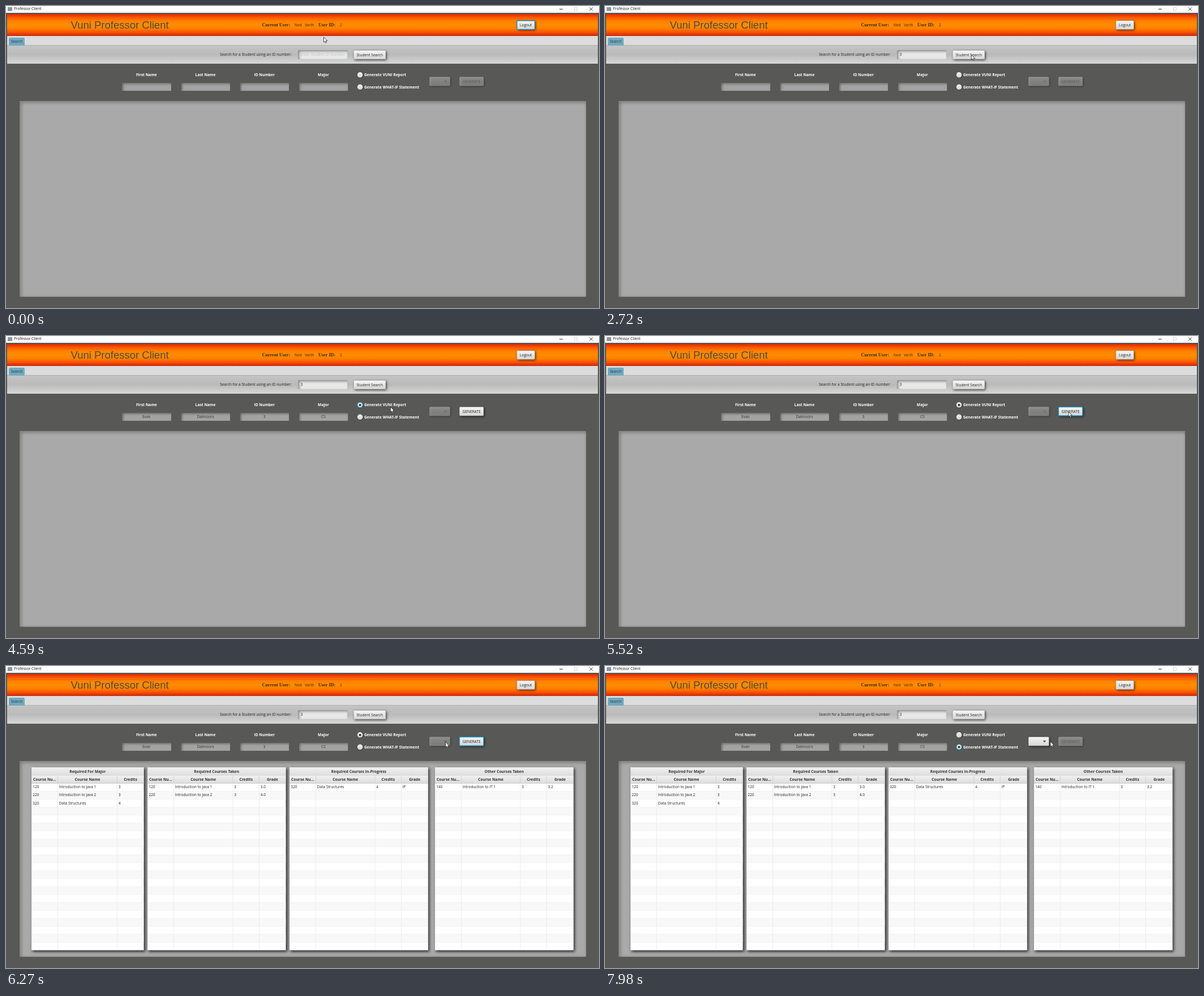
Write an HTML page with a canvas that moves like this. It is 1048x534 px and loops after 8000 ms.

```html
<!DOCTYPE html>
<html lang="en">
<head>
<meta charset="utf-8">
<title>Professor Client</title>
<style>
  html, body { margin: 0; width: 100%; height: 100%; overflow: hidden; background: #585856; }
  canvas { display: block; }
</style>
</head>
<body>
<canvas id="stage" width="1048" height="534"></canvas>
<script>
const c = document.getElementById('stage').getContext('2d');
const LOOP = 8000;
const UI = '6.6px "Open Sans", "Noto Sans", sans-serif';
const BOLD = 'bold 6.7px "Open Sans", "Noto Sans", sans-serif';
const SERIF = 'bold 8.2px "Liberation Serif", serif';
const TITLE = '18.5px "Liberation Sans", Arial, sans-serif';

// Moments of the interaction, in ms
const T = { focus: 1070, blink: 1680, typed: 1720, search: 2900, found: 2960,
            report: 4080, generate: 5290, tables: 5550, whatIf: 7050 };

// Pointer path: time, x, y
const PATH = [
  [440, 561.5, 55], [910, 547.5, 86], [2240, 547.5, 86], [2760, 649, 86],
  [3070, 649, 86], [3600, 620, 122.5], [3760, 620.5, 122], [3900, 621, 122],
  [4400, 621, 122], [4930, 819, 133.5], [5520, 819, 133.5], [5550, 818, 132.5],
  [6120, 818, 132.5], [6640, 616, 142], [6830, 624, 143], [7410, 624, 143],
  [7680, 801, 133], [7840, 801, 133], [7980, 787, 133.5]
];

const TABLES = [
  { x: 45, w: 198.5, title: 'Required For Major', cols: [0, 46.5, 151.5],
    rows: [['120', 'Introduction to Java 1', '3'], ['220', 'Introduction to Java 2', '3'], ['320', 'Data Structures', '4']] },
  { x: 250, w: 244.5, title: 'Required Courses Taken',
    rows: [['120', 'Introduction to Java 1', '3', '3.0'], ['220', 'Introduction to Java 2', '3', '4.0']] },
  { x: 501, w: 245, title: 'Required Courses In-Progress',
    rows: [['320', 'Data Structures', '4', 'IP']] },
  { x: 758, w: 245, title: 'Other Courses Taken',
    rows: [['140', 'Introduction to IT 1', '3', '3.2']] }
];
const HEADS = ['Course Nu...', 'Course Name', 'Credits', 'Grade'];

function rect(x, y, w, h, fill) {
  c.fillStyle = fill;
  c.fillRect(x, y, w, h);
}

function text(s, x, y, font = UI, color = '#222', align = 'left', drop = 2.4) {
  c.font = font;
  c.fillStyle = color;
  c.textAlign = align;
  c.fillText(s, x, y + drop);
}

function fade(y, h, ...colors) {
  const g = c.createLinearGradient(0, y, 0, y + h);
  colors.forEach((col, i) => g.addColorStop(i / (colors.length - 1), col));
  return g;
}

function shadow(color, blur, dx, dy) {
  c.shadowColor = color;
  c.shadowBlur = blur;
  c.shadowOffsetX = dx;
  c.shadowOffsetY = dy;
}

function line(color, width, ...pts) {
  c.strokeStyle = color;
  c.lineWidth = width;
  c.beginPath();
  pts.forEach(([x, y]) => c.lineTo(x, y));
  c.stroke();
}

// Sunken box with a shadow falling from its top left edge
function inset(x, y, w, h, fill, blur) {
  c.save();
  c.beginPath();
  c.rect(x, y, w, h);
  c.clip();
  rect(x, y, w, h, fill);
  shadow('rgba(0,0,0,.8)', blur, 1, 1);
  c.strokeStyle = '#555';
  c.lineWidth = 2;
  c.strokeRect(x - 1, y - 1, w + 4, h + 4);
  c.restore();
}

function button(x, y, w, h, label, { focus, off } = {}) {
  c.save();
  if (off) c.globalAlpha = .4;
  shadow('rgba(0,0,0,.75)', 4, 1.5, 1.5);
  c.beginPath();
  c.roundRect(x, y, w, h, 1.5);
  c.fillStyle = fade(y, h, '#f6f6f6', '#d6d6d6');
  c.fill();
  shadow('transparent', 0, 0, 0);
  c.strokeStyle = focus ? '#1d94c4' : '#aaa';
  c.lineWidth = focus ? 1.3 : .6;
  c.stroke();
  text(label, x + w / 2, y + h / 2, UI, '#222', 'center');
  c.restore();
}

function radio(y, label, on, focus) {
  c.save();
  shadow('rgba(0,0,0,.5)', 2, .5, .5);
  c.beginPath();
  c.arc(625.7, y, 4.8, 0, 7);
  c.fillStyle = fade(y - 5, 10, '#f4f4f4', '#d2d2d2');
  c.fill();
  c.restore();
  if (focus) {
    c.strokeStyle = '#2a8fbd';
    c.lineWidth = 1.2;
    c.stroke();
  }
  if (on) {
    c.beginPath();
    c.arc(625.7, y, 2, 0, 7);
    c.fillStyle = '#333';
    c.fill();
  }
  text(label, 633, y - .2, BOLD, '#fff');
}

function combo(off) {
  button(748.5, 125.5, 36, 15.5, '', { off });
  c.save();
  if (off) c.globalAlpha = .35;
  c.fillStyle = '#444';
  c.beginPath();
  c.moveTo(774, 132);
  c.lineTo(779.5, 132);
  c.lineTo(776.7, 135);
  c.fill();
  c.restore();
}

function table({ x, w, title, cols = [0, 46.5, 151, 197.5], rows }) {
  const top = 179, body = 207.5, pitch = 14.05, bottom = 502.5;
  c.save();
  shadow('rgba(0,0,0,.8)', 5, 2, 2);
  rect(x, top, w, bottom - top, '#fff');
  c.restore();
  rect(x, top, w, 14.3, fade(top, 14.3, '#f1f1f1', '#dedede'));
  rect(x, 193.3, w, 14.2, fade(193.3, 14.2, '#f1f1f1', '#dcdcdc'));
  line('#c4c4c4', .6, [x, 193.3], [x + w, 193.3]);
  line('#bbb', .6, [x, body], [x + w, body]);
  text(title, x + w / 2, 186.6, BOLD, '#333', 'center');
  for (let i = 0; i < 21; i++) {
    const y = body + i * pitch;
    if (i % 2) rect(x, y, w, Math.min(pitch, bottom - y), '#f8f8f8');
    if (i) line('#ececec', .6, [x, y], [x + w, y]);
  }
  cols.forEach((dx, i) => {
    const left = x + dx, right = x + (cols[i + 1] ?? w);
    if (i) {
      line('#c8c8c8', .6, [left, 193.3], [left, body]);
      line('#e9e9e9', .8, [left, body], [left, bottom]);
    }
    text(HEADS[i], (left + right) / 2, 200.6, BOLD, '#333', 'center');
    rows.forEach((row, r) => text(row[i], left + 2.2, 214 + r * pitch));
  });
  c.strokeStyle = '#bbb';
  c.lineWidth = .6;
  c.strokeRect(x, top, w, bottom - top);
}

function pointerAt(t) {
  const i = PATH.findIndex(p => p[0] > t);
  if (i === 0) return PATH[0].slice(1);
  if (i < 0) return PATH.at(-1).slice(1);
  const [t0, x0, y0] = PATH[i - 1], [t1, x1, y1] = PATH[i];
  const u = (t - t0) / (t1 - t0), k = u * u * (3 - 2 * u);
  return [x0 + (x1 - x0) * k, y0 + (y1 - y0) * k];
}

function pointer(t) {
  const [x, y] = pointerAt(t);
  c.save();
  c.translate(x, y);
  if (x > 516 && x < 604 && y > 78 && y < 94) {
    line('#222', .9, [0, -4.5], [0, 4.5]);
    for (const end of [-4.7, 4.7]) line('#222', .8, [-2, end], [2, end]);
  } else {
    c.beginPath();
    for (const p of [[0, 0], [0, 9.2], [2.1, 7.3], [3.5, 10.4], [5, 9.7], [3.7, 6.7], [6.5, 6.6]]) c.lineTo(...p);
    c.closePath();
    c.fillStyle = '#fff';
    c.fill();
    c.strokeStyle = '#222';
    c.lineWidth = .8;
    c.stroke();
  }
  c.restore();
}

function windowBar() {
  rect(0, 0, 1048, 12, '#fff');
  rect(3, 2, 8, 7, '#8797a3');
  text('Professor Client', 14, 5, UI, '#111');
  line('#222', .9, [978, 5.5], [984, 5.5]);
  c.strokeStyle = '#ccc';
  c.lineWidth = .8;
  c.strokeRect(1004.5, 2.8, 5, 5);
  line('#222', .9, [1031, 2.5], [1037, 8.5]);
  line('#222', .9, [1037, 2.5], [1031, 8.5]);
}

function header(t) {
  rect(2, 14, 1044, 39, fade(14, 39, '#d42a08', '#fc5a00', '#ff8200', '#ff8c00', '#ff8000', '#fa5200', '#c82610'));
  text('Vuni Professor Client', 114.5, 33.5, TITLE, '#4f4a3c', 'left', 6.5);
  text('Current User:', 452.5, 34, SERIF, '#3a2a12');
  text('Ned', 510, 34, UI, '#3a2a12');
  text('Varth', 528, 34, UI, '#3a2a12');
  text('User ID:', 552, 34, SERIF, '#3a2a12');
  text('2', 590, 34, UI, '#3a2a12');
  button(903, 26, 31.5, 15.3, 'Logout', { focus: t < T.focus });
}

function searchBar(t) {
  rect(2, 53, 1044, 17, '#dcdcdc');
  rect(2, 69, 1044, 1, '#b0b0b0');
  c.fillStyle = '#72a8bf';
  c.beginPath();
  c.roundRect(5, 56, 28, 14, [2, 2, 0, 0]);
  c.fill();
  text('Search', 8.5, 63, UI, '#243640');
  rect(2, 70, 1044, 32, fade(70, 32, '#c4c4c4', '#bababa', '#d8d8d8'));
  text('Search for a Student using an ID number:', 378, 86);
  inset(516.5, 78.5, 87, 15.5, '#e8e8e8', 4);
  if (t < T.focus) text('Enter Student ID Number', 520.5, 86, UI, '#b9c0c0');
  else if (t < T.blink) line('#222', .8, [521.3, 81.5], [521.3, 90.5]);
  if (t >= T.typed) text('3', 520.7, 86);
  button(614.5, 78.5, 56.5, 15.5, 'Student Search', { focus: t >= T.search && t < T.report });
}

function form(t) {
  const fields = [['First Name', 'Evan'], ['Last Name', 'Dalmoors'], ['ID Number', '3'], ['Major', 'CS']];
  fields.forEach(([label, value], i) => {
    const x = 205 + i * 104.2;
    text(label, x + 43.3, 121.7, BOLD, '#fff', 'center');
    inset(x, 135.5, 87, 14.5, '#a3a3a3', 4);
    if (t >= T.found) text(value, x + 43.3, 142.8, UI, '#333', 'center');
  });
  const report = t >= T.report && t < T.whatIf, whatIf = t >= T.whatIf;
  radio(121.9, 'Generate VUNI Report', report, report && t < T.generate);
  radio(143.3, 'Generate WHAT-IF Statement', whatIf, whatIf);
  combo(!whatIf);
  button(801.5, 125.5, 42.5, 15.5, 'GENERATE', { off: !report, focus: report && t >= T.generate });
}

function draw(t) {
  rect(0, 0, 1048, 534, '#585856');
  windowBar();
  header(t);
  searchBar(t);
  form(t);
  inset(24, 168, 1001.5, 346.5, '#a9a9a9', 6);
  if (t >= T.tables) TABLES.forEach(table);
  pointer(t);
}

const start = performance.now();
function tick() {
  draw((performance.now() - start) % LOOP);
  requestAnimationFrame(tick);
}
tick();
</script>
</body>
</html>
```
